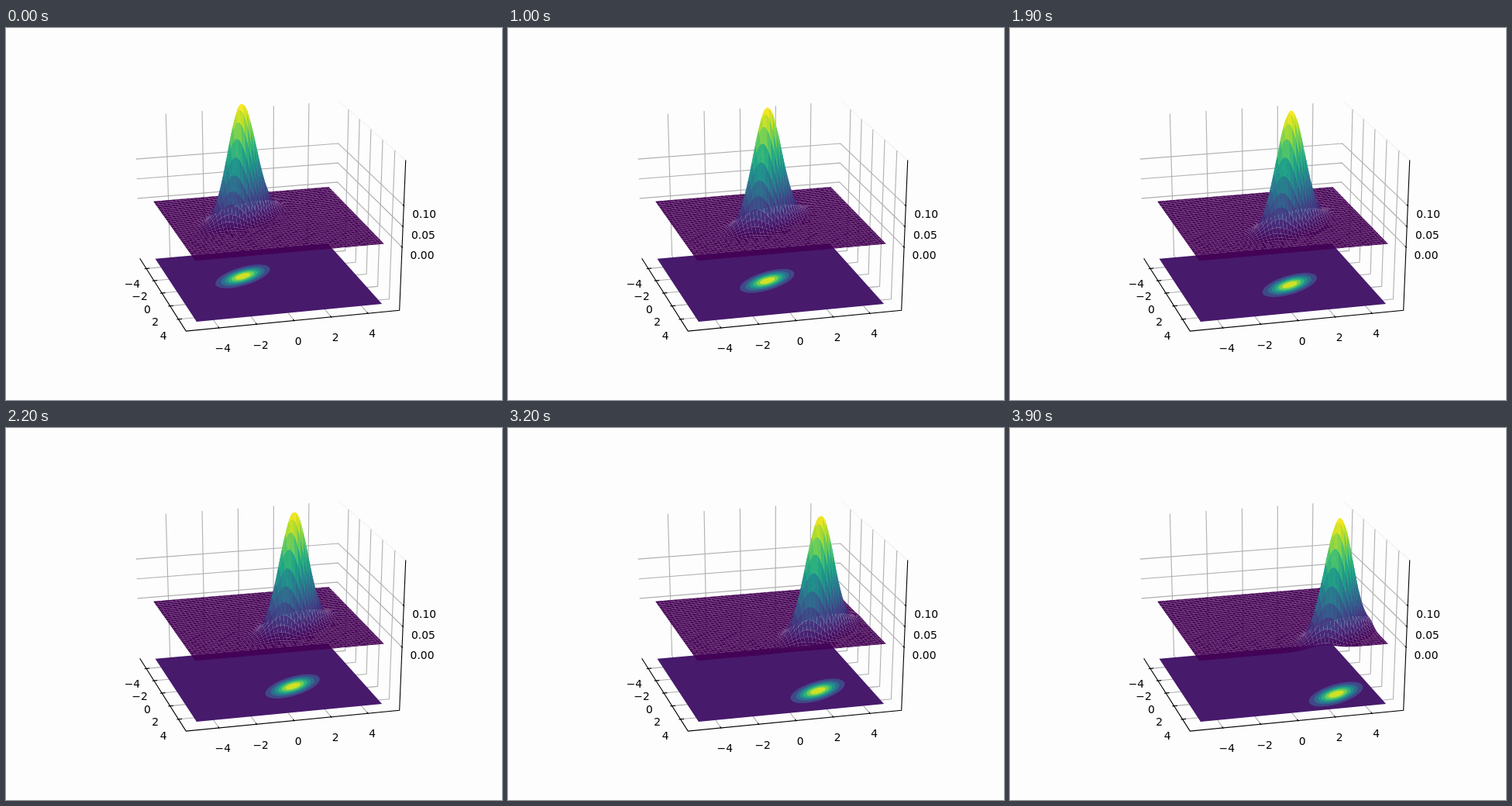
Animation of 640 by 480 pixels, one loop 4 s. Source, as an HTML page with a canvas:

```html
<!DOCTYPE html>
<html lang="en">
<head>
<meta charset="utf-8">
<title>Moving bivariate Gaussian</title>
<style>
html, body { margin: 0; width: 640px; height: 480px; overflow: hidden; background: #fdfdfd; }
canvas { display: block; }
</style>
</head>
<body>
<canvas id="plot" width="640" height="480"></canvas>
<script>
const ctx = document.getElementById('plot').getContext('2d');

// Camera
const ELEV = 25 * Math.PI / 180, AZIM = -15 * Math.PI / 180, DIST = 10;
const sinE = Math.sin(ELEV), cosE = Math.cos(ELEV), sinA = Math.sin(AZIM), cosA = Math.cos(AZIM);

// Axis limits and the slightly larger box around them
const SPAN = 11, Z_MIN = -0.15, Z_SPAN = 0.35;
const EDGE = SPAN / 2 + SPAN / 48;
const BOTTOM = Z_MIN - Z_SPAN / 48, TOP = Z_MIN + Z_SPAN * 49 / 48;

// Gaussian covariance
const VAR_X = 0.67, VAR_Y = 0.79, COV = -0.45;
const DET = VAR_X * VAR_Y - COV * COV;
const PEAK = 1 / (2 * Math.PI * Math.sqrt(DET));

const SAMPLES = 100, STRIDE = 2, LEVEL = 0.04, BANDS = 7;
const VIRIDIS = [
  [68, 1, 84], [72, 36, 117], [65, 68, 135], [53, 95, 141], [42, 120, 142], [33, 145, 140],
  [34, 168, 132], [68, 191, 112], [122, 209, 81], [189, 223, 38], [253, 231, 37]
];

function project(x, y, z) {
  const X = x / SPAN, Y = y / SPAN, Z = (z - Z_MIN) / Z_SPAN - 0.5;
  const depth = cosE * (cosA * X + sinA * Y) + sinE * Z;
  const scale = DIST / (DIST - depth);
  const right = cosA * Y - sinA * X;
  const up = cosE * Z - sinE * (cosA * X + sinA * Y);
  return [334.7 + 268.11 * right * scale, 237.41 - 199.78 * up * scale, depth];
}

function viridis(v) {
  const p = Math.min(Math.max(v, 0), 1) * 10, i = Math.min(Math.floor(p), 9);
  return `rgb(${VIRIDIS[i].map((c, k) => Math.round(c + (VIRIDIS[i + 1][k] - c) * (p - i)))})`;
}

function density(dx, dy) {
  return PEAK * Math.exp(-(VAR_Y * dx * dx - 2 * COV * dx * dy + VAR_X * dy * dy) / (2 * DET));
}

function trace(points) {
  ctx.beginPath();
  for (const [x, y] of points) ctx.lineTo(x, y);
}

function fill(points, color) {
  trace(points);
  ctx.fillStyle = color;
  ctx.fill();
}

function line(color, ...points) {
  trace(points.map(p => project(...p)));
  ctx.strokeStyle = color;
  ctx.stroke();
}

function label(text, x, y, z) {
  const [px, py] = project(x, y, z);
  ctx.fillText(text.replace('-', '\u2212'), px, Math.round(py + 10.8));
}

function drawAxes() {
  const GRID = '#b0b0b0', unit = SPAN / 12;
  const outer = EDGE + 0.1 * unit, inner = EDGE - 0.2 * unit;
  const far = EDGE + 0.8857 * unit, below = BOTTOM - 0.8857 * Z_SPAN / 12;
  const ticks = [-4, -2, 0, 2, 4], zTicks = [0, 0.05, 0.1];
  ctx.lineWidth = 1.11;
  ctx.font = '13.89px "DejaVu Sans", sans-serif';
  ctx.textAlign = 'center';

  line('#f2f2f2', [-EDGE, EDGE, TOP], [EDGE, EDGE, TOP]);
  for (const t of ticks) {
    line(GRID, [t, -EDGE, BOTTOM], [t, EDGE, BOTTOM], [t, EDGE, TOP]);
    line(GRID, [EDGE, t, BOTTOM], [-EDGE, t, BOTTOM], [-EDGE, t, TOP]);
  }
  for (const z of zTicks) line(GRID, [-EDGE, -EDGE, z], [-EDGE, EDGE, z], [EDGE, EDGE, z]);

  line('#000', [-EDGE, -EDGE, BOTTOM], [EDGE, -EDGE, BOTTOM], [EDGE, EDGE, BOTTOM], [EDGE, EDGE, TOP]);
  ctx.fillStyle = '#000';
  for (const t of ticks) {
    line('#000', [t, -outer, BOTTOM], [t, -inner, BOTTOM]);
    line('#000', [outer, t, BOTTOM], [inner, t, BOTTOM]);
    label(String(t), t, -far, below);
    label(String(t), far, t, below);
  }
  for (const z of zTicks) {
    line('#000', [outer, EDGE, z], [inner, EDGE, z]);
    label(z.toFixed(2), far, far, z);
  }
}

function drawContours(mean) {
  const corners = [[-5, -5], [5, -5], [5, 5], [-5, 5]];
  fill(corners.map(([x, y]) => project(x, y, Z_MIN)), viridis(0.5 / BANDS));
  const sx = Math.sqrt(VAR_X), skew = COV / sx, sy = Math.sqrt(DET / VAR_X);
  for (let band = 1; band < BANDS; band++) {
    const r = Math.sqrt(2 * Math.log(PEAK / (LEVEL * band)));
    const ring = Array.from({ length: 72 }, (_, k) => {
      const c = r * Math.cos(k * Math.PI / 36), s = r * Math.sin(k * Math.PI / 36);
      return project(mean + sx * c, mean + skew * c + sy * s, Z_MIN);
    });
    fill(ring, viridis((band + 0.5) / BANDS));
  }
}

function drawSurface(mean) {
  const at = i => -5 + 10 * i / (SAMPLES - 1);
  const grid = Array.from({ length: SAMPLES }, (_, i) =>
    Array.from({ length: SAMPLES }, (_, j) => {
      const z = density(at(i) - mean, at(j) - mean);
      return [...project(at(i), at(j), z), z];
    }));
  const average = (points, k) => points.reduce((sum, p) => sum + p[k], 0) / points.length;
  const cells = [];
  for (let i = 0; i < SAMPLES - 1; i += STRIDE) {
    for (let j = 0; j < SAMPLES - 1; j += STRIDE) {
      const i2 = Math.min(i + STRIDE, SAMPLES - 1), j2 = Math.min(j + STRIDE, SAMPLES - 1);
      const points = [];
      for (let k = j; k < j2; k++) points.push(grid[i][k]);
      for (let k = i; k < i2; k++) points.push(grid[k][j2]);
      for (let k = j2; k > j; k--) points.push(grid[i2][k]);
      for (let k = i2; k > i; k--) points.push(grid[k][j]);
      cells.push({ points, depth: average(points, 2), height: average(points, 3) });
    }
  }
  const highest = Math.max(...cells.map(c => c.height));
  cells.sort((a, b) => a.depth - b.depth);
  for (const c of cells) fill(c.points, viridis(c.height / highest));
}

let shown = -1;
function draw() {
  const step = Math.floor(performance.now() / 100) % 40;
  if (step !== shown) {
    shown = step;
    const mean = -1 + step / 10;
    ctx.fillStyle = '#fdfdfd';
    ctx.fillRect(0, 0, 640, 480);
    drawAxes();
    drawContours(mean);
    drawSurface(mean);
  }
  requestAnimationFrame(draw);
}
draw();
</script>
</body>
</html>
```
